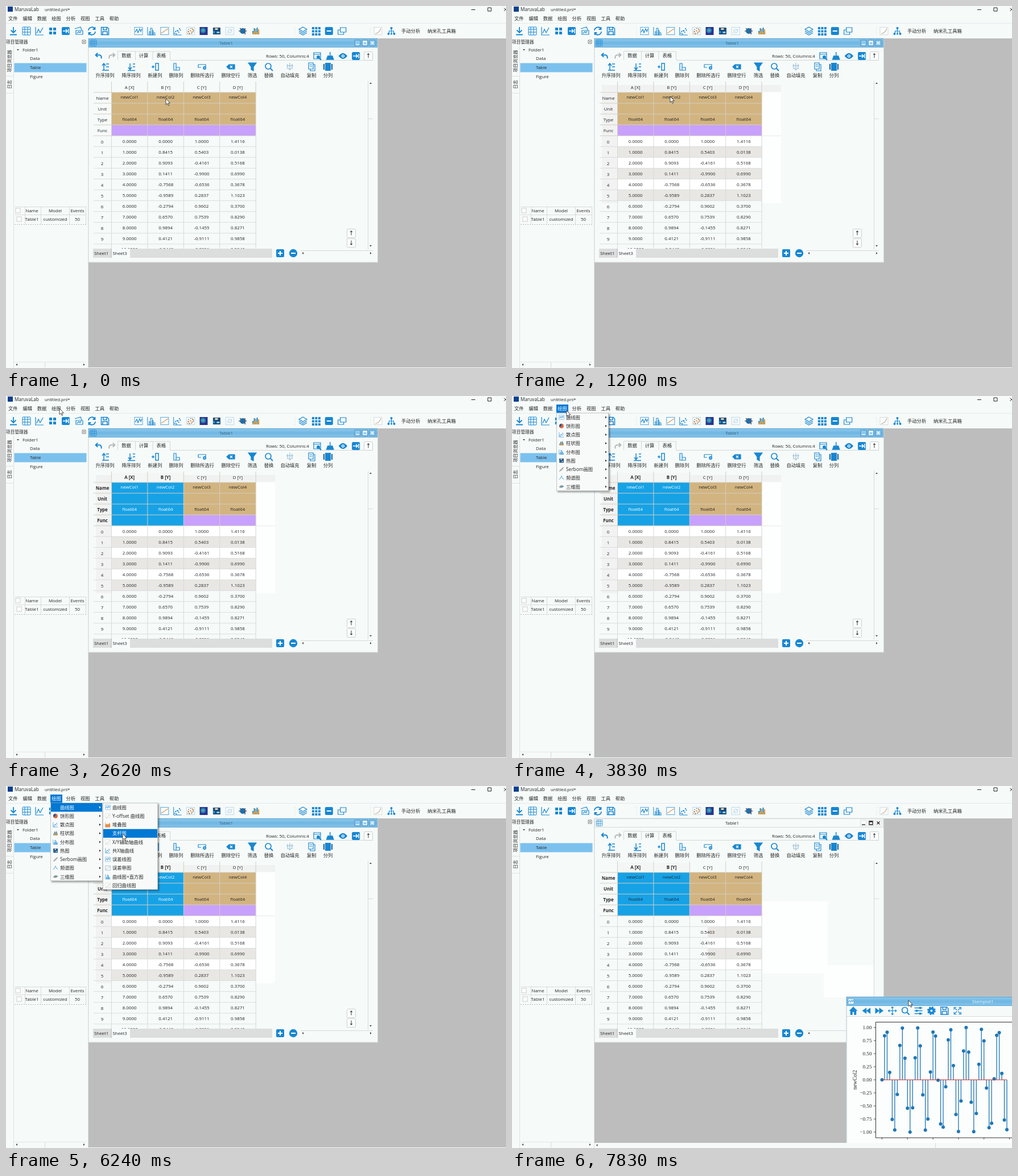
An HTML page that plays this animation: 879 by 637 pixels, repeating every 8000 ms.

```html
<!DOCTYPE html>
<html lang="zh">
<head>
<meta charset="utf-8">
<title>Stem plot demo</title>
<style>
html, body { margin: 0; width: 100%; height: 100%; overflow: hidden; background: #f6faf9; }
svg { display: block; width: 879px; height: 637px; }
text { font-family: "Open Sans", "Noto Sans CJK SC", "Noto Sans CJK", sans-serif; white-space: pre; }
.serif { font-family: "Liberation Serif", serif; }
.menu { filter: drop-shadow(2px 2px 1.5px rgba(0,0,0,.4)); }
</style>
</head>
<body>
<svg id="stage" viewBox="0 0 879 637" xmlns="http://www.w3.org/2000/svg"></svg>
<script>
const LOOP = 8000;
const BG = '#f6faf9', BLUE = '#1787d2', HOT = '#0078d4', INK = '#262626', EDGE = '#cdd1d1';
const stage = document.getElementById('stage');

// --- markup helpers ---
const rect = (x, y, w, h, fill, stroke = 'none', rx = 0) =>
  `<rect x="${x}" y="${y}" width="${w}" height="${h}" fill="${fill}" stroke="${stroke}" rx="${rx}"/>`;
const path = (d, stroke = BLUE, fill = 'none', w = 1.2) =>
  `<path d="${d}" stroke="${stroke}" fill="${fill}" stroke-width="${w}"/>`;
const line = (x1, y1, x2, y2, c = EDGE, w = 1) => path(`M${x1} ${y1}L${x2} ${y2}`, c, 'none', w);
const dot = (x, y, r, fill = BLUE) => `<circle cx="${x}" cy="${y}" r="${r}" fill="${fill}"/>`;
const at = (x, y, body, k = 1) => `<g transform="translate(${x} ${y}) scale(${k})">${body}</g>`;
const span = (from, to, body) => `<g data-from="${from}" data-to="${to}">${body}</g>`;
const range = n => [...Array(n).keys()];
const text = (x, y, s, { fill = INK, anchor = 'start', bold = false, turn = 0, size, cls = '' } = {}) => {
  const fs = size || (/[\u4e00-\u9fff]/.test(s) ? 8.3 : 7.9);
  return `<text transform="translate(${x} ${y}) rotate(${turn})" y="${fs * .36}" font-size="${fs}" fill="${fill}"` +
    ` text-anchor="${anchor}" font-weight="${bold ? 700 : 400}" class="${cls}">${s}</text>`;
};
const mid = (x, y, s, o = {}) => text(x, y, s, { anchor: 'middle', ...o });
const tri = (x, y, turn, c = '#444', r = 2) =>
  `<path transform="translate(${x} ${y}) rotate(${turn})" d="M${-r} ${-r / 2}H${r}L0 ${r / 2 + .6}Z" fill="${c}"/>`;

// --- icons, centred on 0,0 and about 14 px wide ---
const frame = (body, c = '#5aa7dc') => rect(-7, -6.5, 14, 13, '#fbfdfd', c) + body;
const tile = body => rect(-7, -7, 14, 14, BLUE, 'none', 2) + body;
const bars = (c, hs) => hs.map((h, i) => rect(-6 + i * 2.5, 6 - h, 2, h, c)).join('');
const specks = (c, r = 1) => range(8).map(i => dot(-5 + i * 1.4, 4 - i * .9 + 3 * Math.sin(i * 4), r, c)).join('');
const icons = {
  down: path('M0-7V3M-4.5-1.5L0 3L4.500-1.500M-6 6.500H6', BLUE, 'none', 1.8),
  grid: rect(-7, -7, 14, 14, 'none', BLUE, 1) + path('M-7-3H7M-7 2H7M-3-7V7M2-7V7', BLUE, 'none', 1),
  curve: path('M-7-7V7H7M-5 4L-2-3L1 3L6-6'),
  four: [[-6, -6], [1, -6], [-6, 1], [1, 1]].map(p => rect(...p, 5, 5, BLUE)).join(''),
  enter: tile(path('M-5 0H3M0-3L3 0L0 3M5-4V4', '#fff', 'none', 1.5)),
  cards: path('M-7-4L3-7L5-2M-5-1H7V6H-5ZM-3 4L0 1L2 3L4 0'),
  sync: path('M-6-1A6 6 0 0 1 5-4M6 1A6 6 0 0 1-5 4M5.500-7V-3H1.500M-5.500 7V3H-1.500', BLUE, 'none', 1.8),
  save: path('M-6.500-6.500H4L6.500-4V6.500H-6.500ZM-3-6V-2H3V-6M-4 6V1H4V6', BLUE, 'none', 1.5),
  plot: frame(path('M-6 2L-3-3L-1 3L2-4L4 1L6-4')),
  hist: path('M-7-7V7H7M-4 7V1H-2V7M-2 7V-5H1V7M1 7V-1H3V7M3 7V3H6V7', BLUE, 'none', 1),
  slope: frame(path('M-6 4L6-4', '#d99a5b')),
  scatter: path('M-7-7V7H7', BLUE, 'none', 1) + specks(BLUE, 1.1),
  polar: frame(specks('#d9822b', .9) + '<circle r="4.500" fill="none" stroke="#333" stroke-dasharray="2 2"/>', '#b9d8ec'),
  heat: rect(-7, -7, 14, 14, '#27348f') + dot(-1, -1, 4.500, '#2f86b8') + dot(-1, -1, 2, '#50b39b'),
  mosaic: rect(-6.500, -6, 13, 12, '#174a7c') + rect(-3, -5, 5, 3, '#f2d9ae') + rect(0, 1, 5, 3, '#8ccbe8') + rect(-6, 0, 3, 4, '#1e93da'),
  faint: frame('<circle r="3.500" fill="none" stroke="#a9cfe6"/>' + path('M-5 4L5-4', '#d5dfe5'), '#bcd9ea'),
  ball: dot(0, 0, 5, '#1d6fa8') + path('M-7 0H-4M4-5V6M7 0H4M-5-5L-3-3', '#557', 'none', 1.5),
  bars: bars(BLUE, [6, 11, 8, 12, 5]) + bars('#dd9838', [3, 5, 10, 4, 9]),
  layers: path('M0-7L7-3L0 1L-7-3ZM-7 0L0 4L7 0M-7 3L0 7L7 3'),
  dots: range(9).map(i => rect(-7 + i % 3 * 5.500, -7 + (i / 3 | 0) * 5.500, 4, 4, BLUE)).join(''),
  minus: tile(path('M-4 0H4', '#fff', 'none', 2)),
  windows: path('M-3-6H7V2H-3ZM-3-2H-7V6H3V2'),
  fade: frame(path('M-5 5Q3 3 5-5', '#c9b7a2'), '#d5dbdd'),
  tree: path('M0-4V0M-4 4V0H4V4M0 0V4') + dot(0, -5, 2) + dot(-5, 5, 2) + dot(0, 5, 1.500) + dot(5, 5, 2),
  up: path('M-2 6V-5M-5-2L-2-6L1-2M2-5H7M2 0H7M-5 6H7', BLUE, 'none', 1.500),
  sink: path('M-2-6V4M-5 1L-2 5L1 1M3-5H7M3 0H7M-6 6.500H7', BLUE, 'none', 1.500),
  addCol: path('M1-6H6V6H1ZM-6 0H-1M-3.500-2.500V2.500', BLUE, 'none', 1.500),
  delCol: path('M-4-6H0V6H-4ZM0 1H6V6H0'),
  delRow: path('M-7-4H6V1H3M-7-4V1H-2') + dot(4, 2, 3) + path('M2.500 2H5.500', '#fff'),
  erase: path('M-7 0L-3-4H7V4H-3Z', BLUE, BLUE) + path('M-1-2L3 2M3-2L-1 2', '#fff'),
  funnel: path('M-7-7H7L2 0V7L-2 5V0Z', BLUE, BLUE),
  zoom: '<circle cx="-1" cy="-1" r="5" fill="none" stroke="#1787d2" stroke-width="1.700"/>' + path('M3 3L7 7', BLUE, 'none', 2),
  fill: path('M0-7V5M-3 2L0 6L3 2M-6-2H6M-4-5V4M4-5V4', '#8fb9d4', 'none', 1),
  copy: path('M-5-7H3V4H-5ZM3-4H6V7H-2V4M-3-4H1M-3-1H1'),
  split: rect(-5, -7, 10, 14, BLUE) + path('M-7-5V5M7-5V5', '#1c5f96', 'none', 2),
  undo: path('M-6-2H2Q6-1 5 5M-2-6L-6-2L-2 2', BLUE, 'none', 2.200),
  find: path('M-6-6H6V5H-6ZM-6-3H6') + dot(2, 2, 3) + path('M4 4L7 7', BLUE, 'none', 2),
  broom: path('M0-7V-1M-4 0H4L6 6H-6Z', BLUE, BLUE, 1.500),
  eye: path('M-7 0Q0-9 7 0Q0 9-7 0Z', BLUE, BLUE) + dot(0, 0, 2.600, '#fff') + dot(0, 0, 1.300),
  home: path('M-7 0L0-7L7 0H5V7H1.500V2H-1.500V7H-5V0Z', BLUE, BLUE, .5),
  back: path('M0-5V5L-7 0ZM7-5V5L0 0Z', BLUE, BLUE, .5),
  next: path('M0-5V5L7 0ZM-7-5V5L0 0Z', BLUE, BLUE, .5),
  move: path('M-7 0H7M0-7V7M-5-2L-7 0L-5 2M5-2L7 0L5 2M-2-5L0-7L2-5M-2 5L0 7L2 5'),
  sliders: path('M-7-5H7M-7 0H7M-7 5H7', BLUE, 'none', 1.500) + dot(3, -5, 2) + dot(-3, 0, 2) + dot(3, 5, 2),
  gear: '<circle r="4" fill="none" stroke="#1787d2" stroke-width="4"/><circle r="6.500" fill="none" stroke="#1787d2" stroke-width="2" stroke-dasharray="2.800 2.300"/>',
  expand: path('M-6-2V-6H-2M2-6H6V-2M6 2V6H2M-2 6H-6V2M-5-5L-1-1M5-5L1-1M-5 5L-1 1M5 5L1 1'),
  pie: dot(0, 0, 6.500, '#d8683d') + path('M0 0V-6.500A6.500 6.500 0 0 0-6 3Z', 'none', '#24539b'),
  area: path('M-7 7V1L-3-3L1 0L4-5L7-2V7Z', 'none', '#ea8f3c') + path('M-7-7V7H7', '#d77'),
  brush: path('M-6 6Q-3-1 6-6Q3 3-6 6', '#888', '#ccc'),
  wave: path('M-7 4Q-3 4 0-6Q3 4 7 4'),
  cube: path('M-7 1Q0-7 7-1Q1 6-7 1Z', '#e19a4b', '#4aa3db')
};
const icon = (name, x, y, k = 1) => at(x, y, icons[name], k);
const row = (names, x, y, step) => names.split(' ').map((n, i) => icon(n, x + i * step, y)).join('');

// --- main window ---
const menuBar = '文件 编辑 数据 绘图 分析 视图 工具 帮助'.split(' ');
function shell() {
  const grip = x => [38, 42, 46, 50].map(y => dot(x, y, .6, '#c4c8c8')).join('');
  return rect(0, 0, 879, 637, BG) + rect(3, 1, 9, 9, '#0c3f8e') +
    text(15, 6, 'MaruvaLab', { size: 8.2 }) + text(68, 6, 'untitled.pnl*', { size: 7.5 }) +
    path('M818 6.500H825M847 3H853V9H847ZM875.500 3.500L881 9M875.500 9L881 3.500', '#222', 'none', 1) +
    menuBar.map((s, i) => text(4 + i * 25.4, 22, s)).join('') + line(0, 30.5, 879, 30.5, '#e6eaea') +
    row('down grid curve four enter cards sync save', 13, 44, 23) +
    row('plot hist slope scatter polar heat mosaic faint ball bars', 233, 44, 22.9) +
    row('layers dots minus windows', 522, 44, 22.9) + row('fade tree', 654, 44, 23.5) +
    grip(219) + grip(508) + grip(641) +
    text(695, 44, '手动分析') + text(741, 44, '纳米孔工具箱');
}
function sidePanel() {
  const cell = (x, w, y, s) => mid(x + w / 2, y, s);
  return text(0, 63, '项目管理器', { size: 7.7 }) +
    path('M134 60H140V66H134ZM135.500 61.500L138.500 64.500M138.500 61.500L135.500 64.500', '#666', 'none', .8) +
    path('M0 123.500H13M0 153.500H13M13.500 70V637M144.500 57V637', '#dde1e1', 'none', 1) +
    mid(6.5, 97, '项目浏览器', { turn: -90, size: 7.8 }) + mid(6.5, 138, '日志', { turn: -90, size: 7.8 }) +
    rect(14.5, 100.5, 127, 16, '#7cc1ee') + tri(21, 77, 0) + text(29, 77, 'Folder1') +
    ['Data', 'Table', 'Figure'].map((s, i) => text(42, 92.5 + i * 16, s)).join('') +
    path('M15.500 353.500H140.500M15.500 367.500H140.500M33.500 353V384M61.500 353V384M111.500 353V384M140.500 353V384', '#d7dbdb', 'none', 1) +
    `<path d="M15 384.500H141" stroke="#bbb" stroke-dasharray="2 2"/>` +
    rect(17, 356, 8, 8, '#fff', '#ccc') + rect(19, 371, 8, 8, '#fff', '#ccc') +
    cell(32, 27, 360.5, 'Name') + cell(62, 49, 360.5, 'Model') + cell(111, 29, 360.5, 'Events') +
    cell(32, 27, 375.5, 'Table1') + cell(62, 49, 375.5, 'customized') + cell(111, 29, 375.5, '50') +
    tri(19, 631, 90) + tri(137, 631, -90) + line(68.5, 627, 68.5, 636, '#d4d8d8') + line(15, 626.5, 141, 626.5, '#e4e8e8');
}

// --- child windows ---
const titleBar = (w, active, title, titleX, ink) =>
  rect(.5, .5, w - 1, 15, active ? 'url(#bar)' : BG, active ? '#5fa5d2' : '#d5d9d9') + mid(titleX, 8.5, title, { fill: ink }) +
  [w - 35, w - 22, w - 9].map((x, i) => rect(x - 5, 3, 10, 10, active ? '#8fc9ec' : '#fafcfc', active ? '#4d93c2' : '#ddd') +
    at(x, 8, path(['M-3 3H3', 'M-3-3H3V3H-3ZM-3-2H3', 'M-2.500-2.500L2.500 2.500M2.500-2.500L-2.500 2.500'][i], active ? '#f8fcff' : '#222', 'none', 1.3))).join('');

const X0 = 185.5, CW = 63.4, Y0 = 152, RH = 19.06, META = 4;
const colX = c => X0 + c * CW, rowY = r => Y0 + r * RH;
const heads = ['A [X]', 'B [Y]', 'C [Y]', 'D [Y]'], metas = ['Name', 'Unit', 'Type', 'Func'];
const last = [1.4116, .0138, .5168, .699, .3678, 1.1023, .37, .829, .8271, .9858, .534];
const metaText = (c, ink) => mid(colX(c) + CW / 2, 160.5, 'newCol' + (c + 1), { fill: ink }) +
  mid(colX(c) + CW / 2, 198.8, 'float64', { fill: ink });
const metaGrid = range(5).map(r => line(154, rowY(r), 439, rowY(r), '#d3cfc2')).join('') +
  range(5).map(c => line(colX(c), 133, colX(c), rowY(META), '#d3cfc2')).join('');
const stripe = (x, w, rows) => rows.map(r => rect(x, rowY(META + r), w, RH, r % 2 ? '#e8e7e3' : '#fff')).join('');

function selected(c, from, to, ink) {
  return span(from, to, rect(colX(c), Y0, CW, RH * META, '#17a2e6') +
    rect(colX(c) + 1, 135, CW - 2, 15, '#f3f6f5') + mid(colX(c) + CW / 2, 143, heads[c], { bold: true }) + metaText(c, ink));
}
function grid() {
  const body = range(11).map(r => {
    const y = rowY(META + r) + RH / 2;
    return mid(169, y + 1.2, String(r)) + [r, Math.sin(r), Math.cos(r), last[r]]
      .map((v, c) => mid(colX(c) + CW / 2, y, v.toFixed(4))).join('') + line(154, y + RH / 2, 439, y + RH / 2, '#dadedd');
  }).join('');
  const names = bold => metas.map((s, r) => mid(169.5, rowY(r) + 10.2, s, { bold })).join('');
  return `<g clip-path="url(#cells)">` +
    span(300, 7130, rect(440, Y0, 33, 195, '#fdfefe') + rect(158, 139, 315, 12, '#f0f2f1') +
      rect(158, Y0, 27, 195, '#f1f2f1') + stripe(X0, 253.6, range(6)) + line(440, 228.5, 473, 228.5, '#e6e8e8')) +
    span(7130, LOOP, stripe(344, 95, range(5)) + rect(440, 203, 115, 127, '#fdfefe') + rect(548, 315, 88, 57, '#fdfefe')) +
    heads.map((s, c) => mid(colX(c) + CW / 2, 143, s)).join('') +
    rect(X0, Y0, CW * 4, RH * 3, '#d2b480') + rect(X0, rowY(3), CW * 4, RH, '#c8a0fe') +
    range(4).map(c => metaText(c, '#222')).join('') + span(0, 1440, names(false)) + span(1440, LOOP, names(true)) +
    selected(0, 1440, 7130, '#fff') + selected(1, 1560, 7130, '#fff') +
    selected(0, 7130, LOOP, '#1b2d3a') + selected(1, 7130, LOOP, '#1b2d3a') +
    metaGrid + body + range(5).map(c => line(colX(c), rowY(META), colX(c), 427, '#d6dada')).join('') + '</g>';
}
function tableWindow() {
  const tools = [['up', 174, '升序排列'], ['sink', 220, '降序排列'], ['addCol', 262, '新建列'], ['delCol', 299, '删除列'],
    ['delRow', 345, '删除所选行'], ['erase', 395, '删除空行'], ['funnel', 433, '筛选'], ['zoom', 462, '替换'],
    ['fill', 499, '自动填充'], ['copy', 537, '复制'], ['split', 566, '分列']];
  const key = (x, y, s) => rect(x - 7.5, y - 7.5, 15, 15, '#fbfdfd', '#ccd0d0', 1) + mid(x, y, s, { size: 9, bold: true });
  return rect(145, 57, 508.5, 394, BG, '#d5d9d9') +
    at(145, 57, span(0, 7130, titleBar(508, true, 'Table1', 242, '#35617f')) + span(7130, LOOP, titleBar(508, false, 'Table1', 242, '#222'))) +
    icon('grid', 153.5, 65, .75) + icon('undo', 163, 88, .9) +
    `<g transform="translate(186 88) scale(-.9 .9)">${icons.undo.replaceAll(BLUE, '#b4b8b8')}</g>` +
    path('M196.500 95V79.500H227.500V95M227.500 80H258V95M258 80H288.500V95M288 95.500H645', '#d3d7d7', 'none', 1) +
    ['数据', '计算', '表格'].map((s, i) => mid(211.5 + i * 30.6, 87, s)).join('') +
    text(457, 88.5, 'Rows: 50, Columns:4') + row('find broom eye enter', 547, 88, 22.7) + key(637, 88, '↑') +
    tools.map(([n, x, s]) => icon(n, x, 107) + mid(x, 122, s)).join('') +
    grid() +
    path('M636.500 132V428M636 198.500H645', '#d6dada', 'none', 1) + tri(641, 136, 180) + tri(641, 422, 0) +
    key(607, 400, '↑') + key(607, 417, '↓') +
    rect(153, 427, 315, 16, '#dcdddd') + rect(186, 427, 32, 16, '#f8fbfb') + line(185, 427, 185, 443, '#bbb') +
    text(155, 435, 'Sheet1') + text(187.5, 435, 'Sheet3') +
    rect(475, 428, 14, 14, BLUE, 'none', 2) + path('M478 435H486M482 431V439', '#fff', 'none', 2) +
    dot(505, 435, 7.2) + path('M501 435H509', '#fff', 'none', 2) +
    tri(522, 435, 90) + tri(641, 435, -90) + line(518, 430.5, 645, 430.5, '#d6dada');
}
function plotWindow() {
  const px = i => 62.5 + i * 4.48, py = v => 146 - v * 92, C = '#1f77b4';
  const yTicks = range(9).map(i => 1 - i / 4).map(v => line(48, py(v), 51, py(v), '#222', .8) +
    text(44.5, py(v), v.toFixed(2).replace('-', '−'), { anchor: 'end', size: 9.2, cls: 'serif' })).join('');
  const xTicks = range(6).map(i => i * 10).map(n => line(px(n), 248, px(n), 251, '#222', .8) +
    mid(px(n), 260, String(n), { size: 9.2, cls: 'serif' })).join('');
  const stems = range(50).map(i => line(px(i), py(0), px(i), py(Math.sin(i)), C, 1.3) + dot(px(i), py(Math.sin(i)), 3, C)).join('');
  return rect(0, 0, 508, 394, BG, '#b9c7cf') + titleBar(508, true, 'Stemplot1', 240, '#eaf4fa') + icon('plot', 8, 8, .7) +
    row('home back next move zoom sliders gear save expand', 12, 24.5, 22.9) + line(0, 34.5, 508, 34.5, '#d6dada') +
    rect(2, 35, 504, 357, '#fcfdfd') + rect(51.5, 44.5, 242, 203.5, 'none', '#333') + yTicks + xTicks +
    mid(15, 146, 'newCol2', { turn: -90, size: 9.5, cls: 'serif' }) + mid(172, 273, 'newCol1', { size: 9.5, cls: 'serif' }) +
    stems + line(px(0), py(0), px(49), py(0), '#d62728', 1.2);
}

// --- menus ---
const PITCH = 15.25;
function menu(x, w, items, arrows, picks) {
  const label = (s, i, ink) => text(x + 17, 37.5 + i * PITCH, s, { fill: ink }) +
    (arrows ? tri(x + w - 5, 37.5 + i * PITCH, -90, ink) : '');
  return `<g class="menu">${rect(x + .5, 30, w - 1, items.length * PITCH - .5, '#f8fafa', '#c3c7c7')}</g>` +
    items.map(([n, s], i) => icon(n, x + 9, 37.5 + i * PITCH, .6) + label(s, i, INK)).join('') +
    picks.map(([i, from, to]) => span(from, to, rect(x + 1, 30 + i * PITCH, w - 2, PITCH, HOT) + label(items[i][1], i, '#fff'))).join('');
}
const mainItems = [['plot', '曲线图'], ['pie', '饼形图'], ['scatter', '散点图'], ['bars', '柱状图'], ['hist', '分布图'],
  ['mosaic', '热图'], ['brush', 'Serbom画图'], ['wave', '频谱图'], ['cube', '三维图']];
const subItems = [['plot', '曲线图'], ['fade', 'Y-offset 曲线图'], ['area', '堆叠图'], ['slope', '支杆图'], ['fade', 'X/Y辅助轴曲线'],
  ['scatter', '共X轴曲线'], ['plot', '误差线图'], ['slope', '误差带图'], ['hist', '曲线图+直方图'], ['fade', '回归曲线图']];

stage.innerHTML = `<defs>
  <linearGradient id="bar" x2="0" y2="1"><stop stop-color="#8ccaf0"/><stop offset=".5" stop-color="#6fb6e2"/><stop offset="1" stop-color="#86c5ec"/></linearGradient>
  <clipPath id="cells"><rect x="150" y="132" width="486" height="295"/></clipPath>
  <clipPath id="mdi"><rect x="145" y="57" width="734" height="579"/></clipPath></defs>` +
  shell() + sidePanel() + rect(145, 57, 734, 579, '#bdbdbd') + tableWindow() +
  span(7130, LOOP, `<g clip-path="url(#mdi)"><g id="plot">${plotWindow()}</g></g>`) +
  span(7480, LOOP, rect(145, 628, 734, 9, BG) + tri(149.500, 632, 90) + line(744.5, 628, 744.5, 637, '#d4d8d8')) +
  span(2790, 7010, rect(78, 15, 21, 15, HOT) + text(80.2, 22, '绘图', { fill: '#fff' }) + menu(78, 92, mainItems, true, [[0, 3950, LOOP]])) +
  span(4240, 7010, menu(170, 97, subItems, false, [[0, 5460, 5760], [1, 5760, 6000], [2, 6000, 6240], [3, 6240, LOOP]])) +
  `<g id="cursor">${path('M0 0V10.500L2.400 8.400L4.200 12.300L5.800 11.600L4.100 7.800H7.400Z', '#222', '#fff', .8)}</g>`;

// --- motion: each move is [start, end, steps, x, y] ---
const cursorMoves = [[0, 0, 1, 281, 163], [130, 130, 1, 265, 163], [300, 540, 3, 217, 144], [660, 1020, 4, 276, 160],
  [1200, 1200, 1, 278, 159], [1320, 1440, 2, 217, 144], [1560, 1670, 2, 283, 146], [1910, 2620, 7, 94, 22],
  [3830, 4070, 3, 99, 32], [5230, 5230, 1, 100, 32], [5350, 5580, 3, 203, 36], [5760, 6240, 5, 205, 84],
  [7010, 7250, 3, 254, 64], [7360, 7710, 4, 698, 376], [7830, 7830, 1, 697, 377]];
const plotMoves = [[0, 0, 1, 145, 57], [7360, 7710, 4, 588, 371]];

function place(moves, t) {
  let x = 0, y = 0;
  for (const [from, to, n, mx, my] of moves) {
    if (t < from) break;
    const gap = n > 1 ? (to - from) / (n - 1) : 1;
    const k = Math.min(1, (Math.floor((t - from) / gap + 1e-6) + 1) / n);
    x += (mx - x) * k;
    y += (my - y) * k;
  }
  return `translate(${x.toFixed(1)} ${y.toFixed(1)})`;
}

const spans = [...stage.querySelectorAll('[data-from]')];
const cursor = document.getElementById('cursor'), plot = document.getElementById('plot');
const start = performance.now();
function draw(now) {
  const t = Math.max(0, now - start) % LOOP;
  for (const g of spans) g.style.display = t >= +g.dataset.from && t < +g.dataset.to ? '' : 'none';
  cursor.setAttribute('transform', place(cursorMoves, t));
  plot.setAttribute('transform', place(plotMoves, t));
  requestAnimationFrame(draw);
}
draw(start);
</script>
</body>
</html>
```
